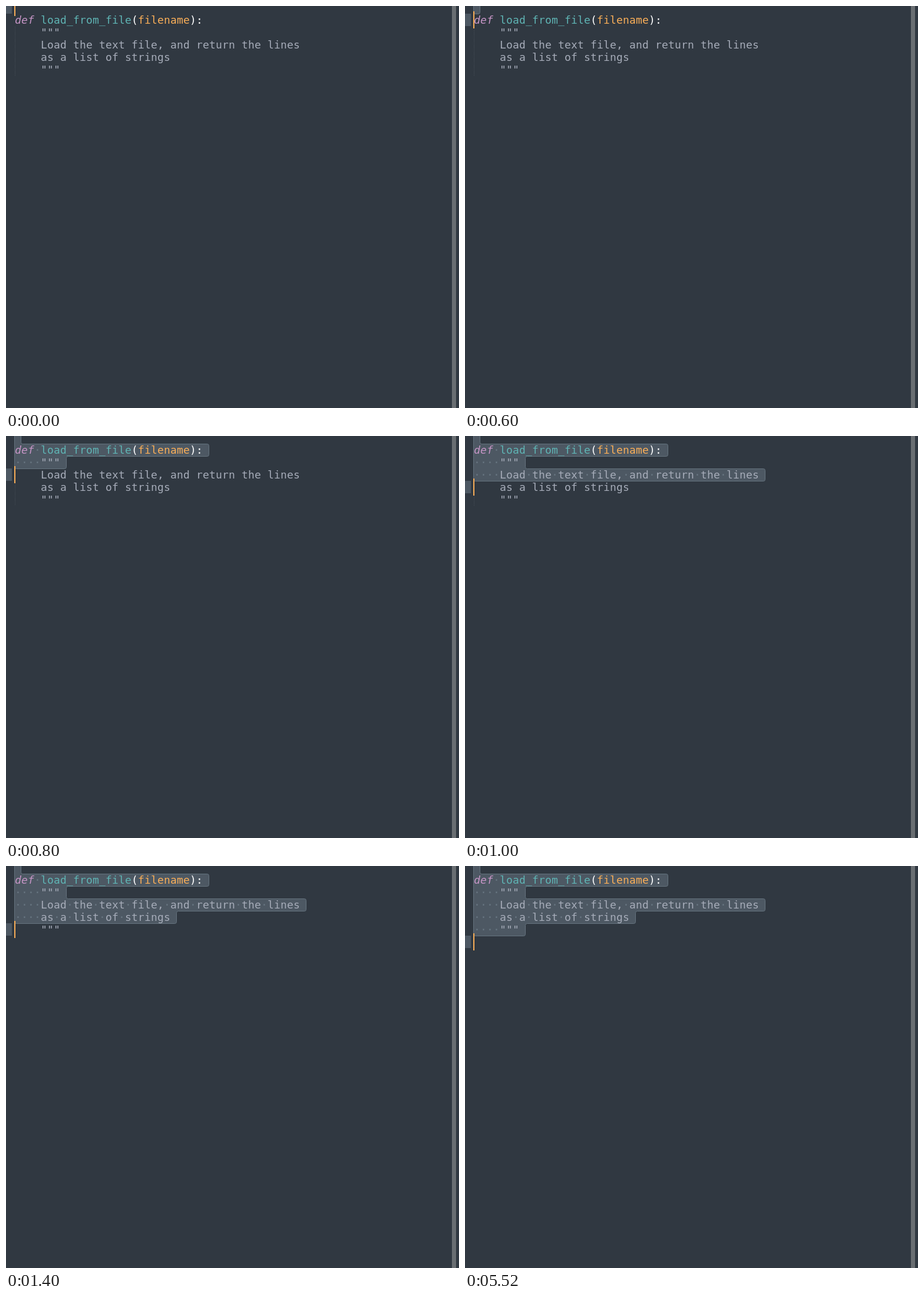
Write an HTML page with a canvas that moves like this. It is 769x681 px and loops after 8 s.

```html
<!DOCTYPE html>
<html lang="en">
<head>
<meta charset="utf-8">
<title>Line selection</title>
<style>
html, body { margin: 0; width: 100%; height: 100%; overflow: hidden; background: #303841; }
canvas { display: block; }
</style>
</head>
<body>
<canvas id="stage" width="769" height="681"></canvas>
<script>
const ctx = document.getElementById('stage').getContext('2d');
const LOOP = 8000, LEFT = 15, TOP = -8, ROW = 21, CELL = 11;
const STEPS = [600, 700, 800, 1000, 1400, 1800]; // each adds one selected line
const FONT = '18px "DejaVu Sans Mono", monospace';
const GREY = '#a6acb9', WHITE = '#ffffff', ORANGE = '#f9ae58';
const SELECTION = '#4d5863', BORDER = '#65737e';

// Each line is a list of [text, colour, style] runs.
const LINES = [
  [],
  [['def', '#c695c6', 'italic '], [' load_from_file', '#5fb4b4'], ['(', WHITE],
   ['filename', ORANGE], ['):', WHITE]],
  [['    """', GREY]],
  [['    Load the text file, and return the lines', GREY]],
  [['    as a list of strings', GREY]],
  [['    """', GREY]]
];
const rowY = i => TOP + i * ROW;
const lineLength = line => line.reduce((sum, [text]) => sum + text.length, 0);

function rect(color, x, y, w, h) {
  ctx.fillStyle = color;
  ctx.fillRect(x, y, w, h);
}

function drawSelection(count) {
  const left = LEFT - 0.5, points = [];
  LINES.slice(0, count).forEach((line, i) => {
    const right = LEFT + (lineLength(line) + 1) * CELL - 0.5;
    points.push([right, rowY(i) + 0.5], [right, rowY(i + 1) + 0.5]);
  });
  points.push([left, rowY(count) + 0.5], [left, TOP]);
  ctx.beginPath();
  ctx.moveTo(left, TOP);
  points.forEach(([x, y], i) => {
    const next = points[i + 1];
    if (next) ctx.arcTo(x, y, ...next, 3);
    else ctx.lineTo(x, y);
  });
  ctx.closePath();
  ctx.fillStyle = SELECTION;
  ctx.fill();
  ctx.strokeStyle = BORDER;
  ctx.lineWidth = 1;
  ctx.stroke();
}

function drawLine(line, i, selected) {
  let col = 0;
  for (const [text, color, style = ''] of line) {
    ctx.font = style + FONT;
    for (const char of text) {
      const dot = char === ' ' && selected;
      ctx.fillStyle = dot ? '#687682' : color;
      ctx.fillText(dot ? '·' : char, LEFT + col++ * CELL, rowY(i) + 17);
    }
  }
}

function draw(time) {
  const current = STEPS.filter(step => time >= step).length;
  rect('#303841', 0, 0, 769, 681);
  rect('#696e72', 757, 0, 7, 681);
  rect(SELECTION, 0, rowY(current), 10, ROW);
  for (let y = rowY(Math.max(2, current)) + 1; y < rowY(6); y += 2) rect('#434b54', 15, y, 1, 1);
  if (current) drawSelection(current);
  LINES.forEach((line, i) => drawLine(line, i, i < current));
  rect(ORANGE, 14, rowY(current) - 4, 2, 29);
}

const start = performance.now();
function tick() {
  draw((performance.now() - start) % LOOP);
  requestAnimationFrame(tick);
}
tick();
</script>
</body>
</html>
```
